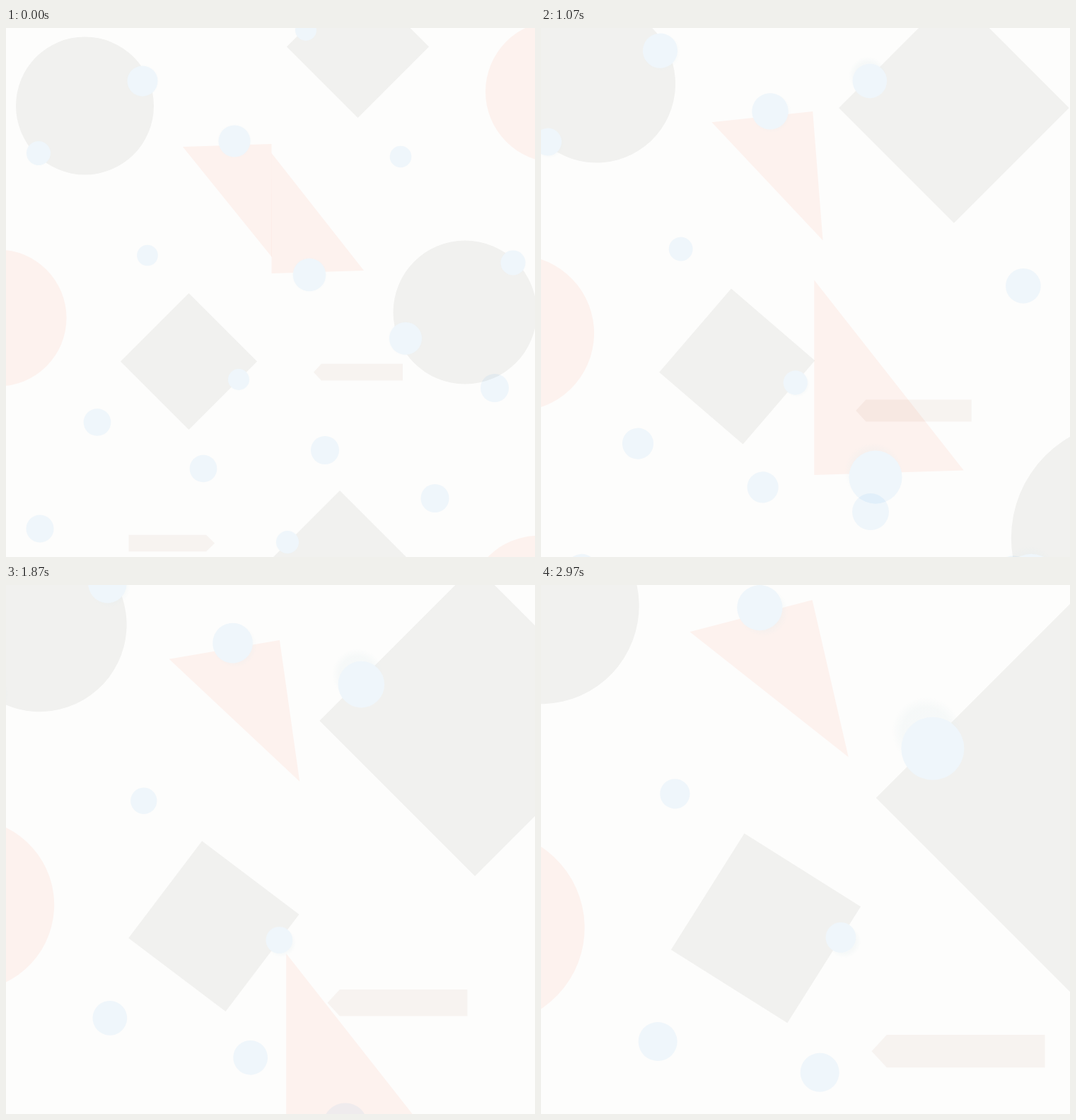
An HTML page with a canvas for the animation above (3010 ms loop, 748 px wide and 748 px high).

```html
<!DOCTYPE html>
<html lang="en">
<head>
<meta charset="utf-8">
<title>Drifting shapes</title>
<style>
html, body { margin: 0; width: 100%; height: 100%; overflow: hidden; background: #fdfdfc; }
canvas { display: block; width: 748px; height: 748px; }
</style>
</head>
<body>
<canvas id="stage" width="748" height="748"></canvas>
<script>
const ctx = document.getElementById('stage').getContext('2d');
const LOOP = 3010, FPS = 30, FRAMES = 90, END = 2.97;
const BG = '#fdfdfc', GREY = '#f1f1ef', BUBBLE = '#eff6fb';
const PINK = '#fff4f1', BAR = '#f9f5f3', DOT = '#f1f8fe'; // multiplied over the rest

// Each layer zooms and turns around a fixed point; round shapes are [x, y, radius].
const layers = [
  {
    at: [183.5, 375.5], grow: 0.425, turn: -12.8, lag: 0.1, shadow: [5, 5.5],
    discs: [[111.5, 110, 97.5]],
    diamonds: [[258.5, 471.5, 96.5]],
    pinkDiscs: [[-11, 410, 96.5]],
    triangle: [250, 168, 375.5, 164, 376, 324],
    bar: [295, 283, 173.5, 728.5, 11.7],
    bubbles: [[193, 75, 21.5], [46, 177, 17], [323, 160, 22.5], [329, 497, 15]],
    dots: [[200, 321.5, 14.8], [129, 557.5, 19.3], [279, 623, 19.3], [48, 708, 19.5]],
  },
  {
    at: [358, -113], grow: 1.97, turn: 0, lag: 0.195, shadow: [-9, -24],
    discs: [[649, 402, 101.5]],
    diamonds: [[497.5, 26.5, 100.5]],
    pinkDiscs: [[778, 90, 100]],
    triangle: [375.5, 177, 506, 343, 375.5, 347],
    bubbles: [[429, 349, 23.2], [565, 439, 23], [717, 332, 17.5], [424, 3, 15]],
    dots: [[558, 182, 15.3]],
  },
  {
    at: [400.5, 304], grow: 0.945, turn: 0, lag: 0.195, shadow: [0, -8],
    discs: [],
    diamonds: [[472, 751, 97]],
    pinkDiscs: [[752, 816, 98]],
    bar: [435, 446, 561, 486.7, 11.9],
    bubbles: [[398, 727, 16]],
    dots: [[451, 597, 20], [606.5, 665, 20], [691, 509, 20]],
  },
];

// Short soft start, then steady speed.
function progress(sec, lag) {
  return (sec - lag * (1 - Math.exp(-sec / lag))) / (END - lag);
}

function place({ at: [x, y], grow, turn }, u, dx = 0, dy = 0) {
  const zoom = 1 + grow * u;
  ctx.setTransform(1, 0, 0, 1, x + dx, y + dy);
  ctx.rotate(turn * u * Math.PI / 180);
  ctx.scale(zoom, zoom);
  ctx.translate(-x, -y);
}

function disc([x, y, r], fill) {
  ctx.fillStyle = fill;
  ctx.beginPath();
  ctx.arc(x, y, r, 0, Math.PI * 2);
  ctx.fill();
}

function poly(p, fill) {
  ctx.fillStyle = fill;
  ctx.beginPath();
  for (let i = 0; i < p.length; i += 2) ctx.lineTo(p[i], p[i + 1]);
  ctx.fill();
}

function diamond([x, y, r], fill) {
  poly([x, y - r, x + r, y, x, y + r, x - r, y], fill);
}

function bar([tip, neck, end, y, h], fill) {
  poly([tip, y, neck, y - h, end, y - h, end, y + h, neck, y + h], fill);
}

function shade([x, y, r]) {
  const size = r * 1.1;
  const soft = ctx.createRadialGradient(x, y, size * 0.7, x, y, size);
  soft.addColorStop(0, 'rgba(222,234,236,.22)');
  soft.addColorStop(1, 'rgba(222,234,236,0)');
  disc([x, y, size], soft);
}

function draw(sec) {
  const pass = (mode, paint) => {
    ctx.globalCompositeOperation = mode;
    for (const layer of layers) {
      const u = progress(sec, layer.lag);
      place(layer, u);
      paint(layer, u);
    }
  };

  ctx.resetTransform();
  ctx.globalCompositeOperation = 'source-over';
  ctx.fillStyle = BG;
  ctx.fillRect(0, 0, 748, 748);

  pass('source-over', l => {
    l.discs.forEach(s => disc(s, GREY));
    l.diamonds.forEach(s => diamond(s, GREY));
  });
  pass('multiply', l => {
    l.pinkDiscs.forEach(s => disc(s, PINK));
    if (l.triangle) poly(l.triangle, PINK);
  });
  pass('source-over', (l, u) => {
    // The shadows slip out from under the bubbles as the layer moves.
    const [dx, dy] = l.shadow;
    place(l, u, dx * u, dy * u);
    l.bubbles.forEach(shade);
    place(l, u);
    l.bubbles.forEach(s => disc(s, BUBBLE));
  });
  pass('multiply', l => {
    if (l.bar) bar(l.bar, BAR);
    l.dots.forEach(s => disc(s, DOT));
  });
}

function tick() {
  const t = performance.now() % LOOP;
  const frame = Math.min(FRAMES - 1, Math.floor((t + 3.4) * FPS / 1000));
  draw(frame / FPS);
  requestAnimationFrame(tick);
}
tick();
</script>
</body>
</html>
```
